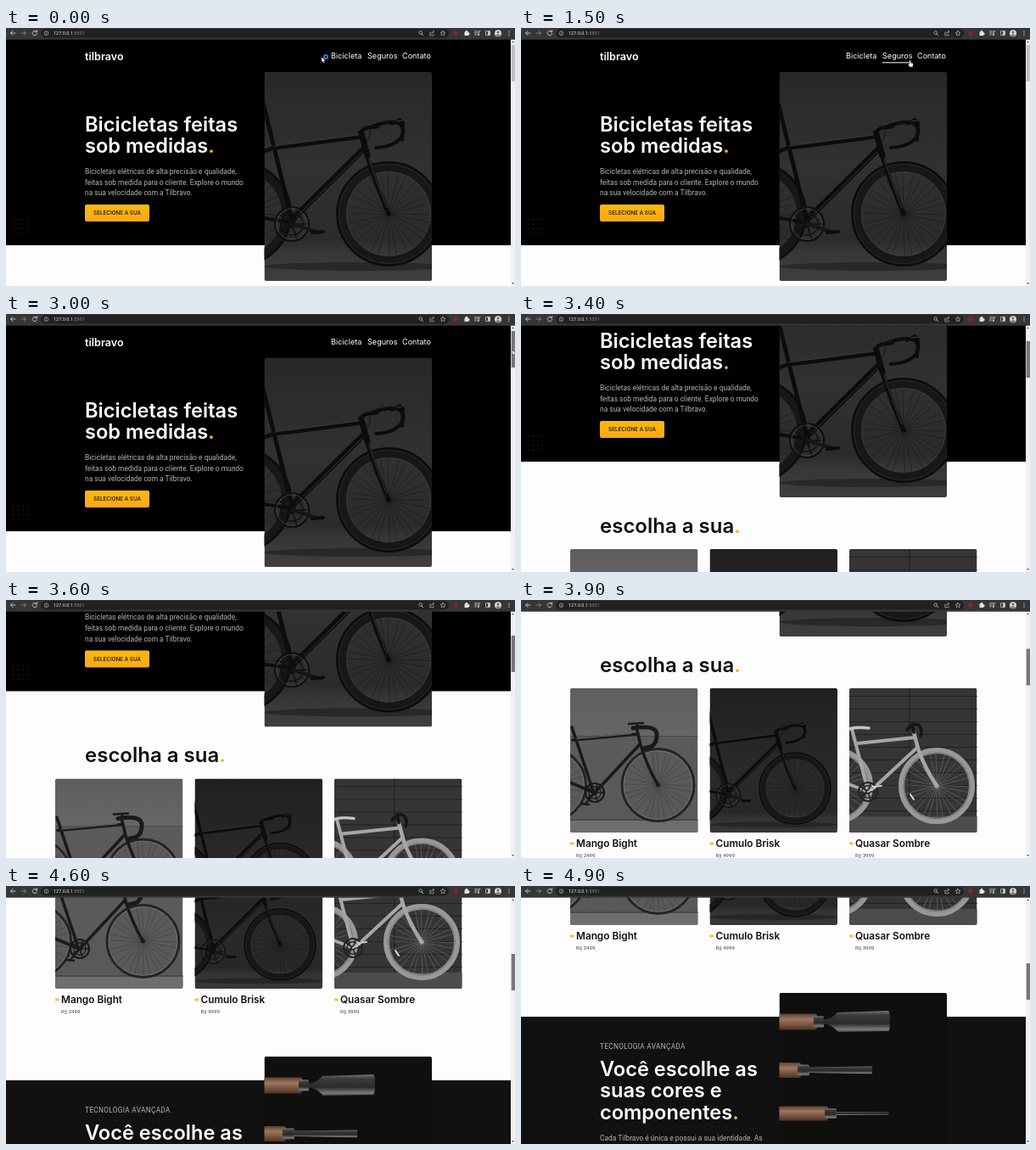
Recreate the animation shown at these times as an HTML page. Size 600 by 304 pixels, loop 5000 ms.

```html
<!DOCTYPE html>
<html lang="pt-BR">
<head>
<meta charset="utf-8">
<title>Loja de bicicletas</title>
<style>
html, body { margin: 0; width: 100%; height: 100%; overflow: hidden; background: #fdfdfd; }
svg { display: block; width: 100vw; height: 100vh; }
text { font-family: Inter, sans-serif; font-weight: 500; white-space: pre; }
.head { font-size: 23.6px; font-weight: 600; fill: #fff; }
.dark { fill: #111; }
.gold { fill: #fdb513; }
.nav { font-size: 9.1px; font-weight: 400; fill: #fff; }
.body { font: 8.43px Roboto, sans-serif; fill: #b4b4b4; }
.label { font: 8.3px Roboto, sans-serif; letter-spacing: .3px; fill: #b4b4b4; }
.name { font-size: 11.8px; font-weight: 600; fill: #111; }
.price { font: 6.1px Roboto, sans-serif; fill: #444; }
.line { fill: none; stroke-linecap: round; stroke-linejoin: round; }
</style>
</head>
<body>
<svg id="stage" viewBox="0 0 600 304" preserveAspectRatio="none"></svg>
<script>
const LOOP = 5000, STEP = 100;

const text = (x, y, cls, s, extra = "") => `<text x="${x}" y="${y}" class="${cls}" ${extra}>${s}</text>`;
const rect = (x, y, w, h, fill, r = 0) => `<rect x="${x}" y="${y}" width="${w}" height="${h}" rx="${r}" fill="${fill}"/>`;
const circle = (x, y, r, fill) => `<circle cx="${x}" cy="${y}" r="${r}" fill="${fill}"/>`;
const ring = (x, y, r, color, w) => `<circle cx="${x}" cy="${y}" r="${r}" fill="none" stroke="${color}" stroke-width="${w}"/>`;
const line = (d, color, w) => `<path class="line" d="${d}" stroke="${color}" stroke-width="${w}"/>`;
const shape = (d, fill) => `<path d="${d}" fill="${fill}"/>`;
const many = (n, f) => Array.from({ length: n }, (_, i) => f(i)).join("");
const dot = '<tspan class="gold">.</tspan>';

function fade(id, stops) {
  const list = stops.map(([o, c]) => `<stop offset="${o}" stop-color="${c}"/>`).join("");
  return `<linearGradient id="${id}" x2="0" y2="1">${list}</linearGradient>`;
}

function photo(id, x, y, w, h, fill, inside) {
  return `<clipPath id="${id}"><rect x="${x}" y="${y}" width="${w}" height="${h}" rx="2"/></clipPath>
    <g clip-path="url(#${id})">${rect(x, y, w, h, fill)}${inside}</g>`;
}

function wheel(x, y, r, tire, width, rim, rimWidth, spoke, n = 28) {
  const inner = r - width - rimWidth / 2;
  const spokes = many(n, i => {
    const a = i / n * 2 * Math.PI, b = a + (i % 2 ? 0.25 : -0.25);
    const p = (q, len) => `${(x + len * Math.cos(q)).toFixed(1)} ${(y + len * Math.sin(q)).toFixed(1)}`;
    return `M${p(a, 2)}L${p(b, inner)}`;
  });
  return line(spokes, spoke, 0.45) + ring(x, y, inner, rim, rimWidth)
    + ring(x, y, r - width / 2, tire, width) + circle(x, y, 2.5, tire);
}

function chainring(x, y, r, color) {
  return ring(x, y, r, color, 2.2) + ring(x, y, r * 0.66, color, 1.3)
    + line(many(5, i => {
      const a = i * 0.4 * Math.PI;
      return `M${x} ${y}l${(r * Math.cos(a)).toFixed(1)} ${(r * Math.sin(a)).toFixed(1)}`;
    }), color, 1.6) + circle(x, y, r * 0.25, color);
}

// black road bike, shared by the hero and the second card
function roadBike() {
  const c = "#0c0c0d", shine = "#4b4a4b";
  return `<ellipse cx="415" cy="281" rx="110" ry="5" fill="#1d1d1d" opacity=".6"/>`
    + wheel(275, 219, 62, c, 3, "#171717", 9, "#111")
    + wheel(451, 219, 62, c, 3, "#171717", 9, "#111")
    + ring(451, 219, 58.7, "#3a3a3a", 0.5) + ring(451, 219, 49.5, "#444", 0.5)
    + line("M302 84Q318 150 336 222M305 145Q316 140 335 139L419 128", c, 5)
    + line("M423 141L337 226", c, 7) + line("M304 224L336 229", c, 4)
    + line("M419 125L426 150", c, 7) + line("M425 149Q436 185 451 219", c, 5)
    + line("M316 139L416 126M420 146L342 223M428 154Q438 186 449 212", shine, 0.7)
    + line("M417 123L424 118L438 116", c, 4.5)
    + line("M432 116Q450 109 462 112Q472 117 466 129Q457 140 436 141", c, 4.2)
    + line("M455 113L464 108L468 112L467 132", c, 4) + line("M460 110L467 109", shine, 0.8)
    + line("M420 139Q431 130 429 121", c, 0.8)
    + chainring(337, 231, 20, "#101010") + ring(337, 231, 18, "#555", 0.6)
    + line("M337 231L366 240", "#161616", 4) + line("M361 241L374 240", c, 4);
}

function fixedBike() {
  const c = "#1a1a1a";
  return wheel(34, 473, 44, "#242424", 3, "#757575", 1, "#353535")
    + wheel(161.5, 473, 44, "#242424", 3, "#757575", 1, "#353535")
    + line("M60 405L85 480M61 420L137 413M88 481L140 425M58 470L86 482", c, 3.6)
    + line("M66 418.5L130 412.5", "#858585", 0.7)
    + line("M136 405L141 426Q149 452 161.5 473", c, 3.6)
    + line("M136 407L137 402M127 401L144 400", c, 2.6)
    + line("M132 406Q158 402 160 412Q161 424 153 428L144 430", c, 5)
    + chainring(87, 482, 11, c) + line("M87 482L76 495M71 495L80 496", c, 2.5);
}

function whiteBike() {
  const c = "#a6a6a6", tire = "#989898";
  return wheel(370, 474, 45, tire, 5.5, "#858585", 1.5, "#858585")
    + wheel(490, 474, 45, tire, 5.5, "#858585", 1.5, "#858585")
    + line("M390 407L409 480M396 424L464 417M412 480L468 428M386 472L410 481", c, 4)
    + line("M463 411L468 430Q475 451 490 474", c, 4.5)
    + line("M386 407Q396 404 410 406", "#c4c4c4", 3.4)
    + line("M463 411L461 401M455 408Q461 400 468 402Q474 406 471 415", "#151515", 3.6)
    + chainring(409, 481, 11, "#242424") + line("M409 481L419 475M414 475L425 474", "#ccc", 2)
    + line("M459 484L463 490", "#ddd", 2);
}

function tool(y, handle, h, ferrule, blade) {
  return rect(300, y - h / 2, handle - 300, h, "url(#wood)", 3)
    + rect(handle - 4, y - h * 0.36, ferrule - handle + 4, h * 0.72, "url(#metal)", 1.5) + blade;
}

function card(i, x, inside, fill, name, price) {
  return photo("card" + i, x, 359, 150.5, 170, fill, inside)
    + rect(x, 540.5, 4.6, 3, "#fdc02a", 0.8)
    + text(x + 7, 546, "name", name) + text(x + 7, 558, "price", price);
}

const links = [
  { x: 383, w: 36, label: "Bicicleta", from: 200, to: 1100 },
  { x: 426, w: 34, label: "Seguros", from: 1100, to: 1800 },
  { x: 467, w: 35, label: "Contato", from: 1800, to: 2100 }
];

function hero() {
  return rect(0, 0, 595, 256, "#000")
    + many(16, i => rect(8 + i % 4 * 5.7, 225 + (i >> 2) * 5.5, 1, 1, "#39342a"))
    + text(93, 37.6, "head", "tilbravo", 'style="font-size:12.6px"')
    + links.map((l, i) => text(l.x, 35.9, "nav", l.label) + `<rect id="bar${i}" x="${l.x}" y="40.3" height="1" fill="#fff"/>`).join("")
    + text(93, 121.8, "head", "Bicicletas feitas") + text(93, 147.3, "head", "sob medidas" + dot)
    + text(93, 172, "body", "Bicicletas elétricas de alta precisão e qualidade,")
    + text(93, 184.7, "body", "feitas sob medida para o cliente. Explore o mundo")
    + text(93, 197.4, "body", "na sua velocidade com a Tilbravo.")
    + rect(93, 208, 76, 20, "url(#button)", 2)
    + text(131, 220.3, "dark", "SELECIONE A SUA", 'text-anchor="middle" font-size="6.3"')
    + photo("hero", 304.5, 52, 197.5, 246, "url(#studio)", roadBike());
}

function shop() {
  const wall = rect(58, 415, 151, 1, "#484848") + rect(156, 416, 1, 98, "#505050")
    + rect(58, 515, 151, 14, "#6e6e6e") + rect(58, 513, 151, 2, "#494949");
  const planks = many(10, i => rect(387, 368 + i * 15, 151, 1, "#222")) + rect(457, 359, 1.5, 151, "#252525")
    + rect(387, 510, 151, 20, "#4c4c4c");
  const mini = `<g transform="translate(323 477) scale(.69) translate(-451 -219)">${roadBike()}</g>`;
  return text(93, 340, "head", "escolha a sua" + dot, 'style="fill:#111;font-size:24px"')
    + card(1, 58, wall + fixedBike(), "url(#wall)", "Mango Bight", "R$ 2499")
    + card(2, 222.5, mini, "url(#night)", "Cumulo Brisk", "R$ 4999")
    + card(3, 387, planks + whiteBike(), "#353535", "Quasar Sombre", "R$ 3999");
}

function tech() {
  const tools = tool(643, 349, 19, 357, shape("M356 641Q366 640 373 632L433 630Q435 631 435 642Q435 653 433 654L374 655Q366 646 356 645Z", "url(#metal)"))
    + tool(700, 330, 18, 340, shape("M339 696.5L414 695.5V704.5L339 703Z", "url(#metal)"))
    + tool(751, 362, 17, 372, shape("M371 749L434 749.5L433 752.5L371 753Z", "url(#metal)"));
  return rect(0, 637, 595, 300, "#111")
    + text(93, 675.3, "label", "TECNOLOGIA AVANÇADA")
    + text(93, 706.8, "head", "Você escolhe as") + text(93, 732.3, "head", "suas cores e")
    + text(93, 757.8, "head", "componentes" + dot)
    + text(93, 782.5, "body", "Cada Tilbravo é única e possui a sua identidade. As")
    + photo("tools", 304.5, 609, 197.5, 247, "#0f0f0e", tools);
}

function toolbar() {
  const c = "#c9cacc";
  return rect(0, 0, 600, 13.7, "#35363a") + rect(41, 1, 481, 10.5, "#202124", 5.2)
    + line("M11 6H5.5M8 3.5L5.5 6L8 8.5", c, 0.9) + line("M18 6H23.5M21 3.5L23.5 6L21 8.5", "#85868a", 0.9)
    + line("M36 4.2A2.7 2.7 0 1 0 36.6 6.6M36.6 2.8V4.8H34.6", c, 0.9)
    + ring(47.5, 6.2, 2.4, c, 0.6) + line("M47.5 6V7.6M47.5 4.7V4.8", c, 0.6)
    + `<text x="56" y="8.2" style="font:5.5px Roboto,sans-serif" fill="#e8eaed">127.0.0.1<tspan fill="#8a8d91">:5501</tspan></text>`
    + ring(488.7, 5.5, 1.8, c, 0.7) + line("M490 7L491.8 8.8", c, 0.8)
    + line("M501 5H499.8V8.8H504.2V7.5M501.5 7Q501.8 4.5 504.5 4.3M503.2 3L504.6 4.3L503.2 5.6", c, 0.6)
    + line("M515 3.2L515.9 5.1L518 5.3L516.4 6.7L516.9 8.8L515 7.7L513.1 8.8L513.6 6.7L512 5.3L514.1 5.1Z", c, 0.6)
    + circle(530, 6, 2.8, "#8c2522")
    + rect(540.5, 4.3, 4.8, 4.8, "#e0e1e3", 0.5) + circle(543, 4, 1.2, "#e0e1e3") + circle(545.4, 6.7, 1.2, "#e0e1e3")
    + line("M552.5 3.8H556.5M552.5 5.8H556.5M552.5 7.8H554.5M557.6 7.8V3.6H559", c, 0.8) + circle(556.8, 8, 1, c)
    + `<rect x="565.5" y="3.5" width="5" height="5" rx=".6" fill="none" stroke="${c}" stroke-width=".8"/>` + rect(568, 3.5, 2.5, 5, c)
    + circle(580, 6.2, 4, "#d6d8dc") + shape("M577 8.8Q580 5.5 583 8.8Q580 11 577 8.8Z", "#77706e") + circle(580, 5, 1.5, "#77706e")
    + many(3, i => circle(593, 4 + i * 2.2, 0.65, c));
}

const stage = document.getElementById("stage");
stage.innerHTML = "<defs>"
  + fade("button", [[0, "#fcb80a"], [1, "#f8a81a"]])
  + fade("studio", [[0, "#292829"], [0.45, "#323132"], [0.8, "#2c2b2c"], [0.86, "#373637"], [1, "#403f40"]])
  + fade("wall", [[0, "#5e5e5e"], [0.33, "#666"], [0.34, "#5b5b5b"], [1, "#585858"]])
  + fade("night", [[0, "#212021"], [0.6, "#2b2a2b"], [0.86, "#282728"], [0.9, "#343334"], [1, "#383738"]])
  + fade("wood", [[0, "#5d4034"], [0.35, "#a0765f"], [1, "#4e3328"]])
  + fade("metal", [[0, "#777473"], [0.2, "#3d3b3a"], [0.6, "#2b2928"], [0.88, "#7d7b7a"], [1, "#45423f"]])
  + "</defs>" + rect(0, 0, 600, 304, "#fdfdfd")
  + `<g id="page">${hero()}${shop()}${tech()}</g>`
  + rect(595, 13, 5, 291, "#f1f1f1") + shape("M596 17.3L597.6 15.3L599.2 17.3Z", "#666") + shape("M596 300L597.6 302L599.2 300Z", "#666")
  + `<rect id="thumb" x="595.7" width="4.3" height="43"/>` + toolbar()
  + `<g id="pointer"><path id="arrow" d="M0 0V6.6L1.5 5.2L2.5 7.5L3.6 7L2.6 4.8H4.7Z" fill="#fff" stroke="#222" stroke-width=".5"/>
    <path id="hand" d="M-.8 .5Q0 -.5 .7 .5V3L3 3.5Q4 3.8 3.8 5L3.2 8H-.3L-2.4 5Q-2.5 4 -1.6 4.3L-.8 5Z" fill="#fff" stroke="#222" stroke-width=".5"/>
    <g id="busy">${ring(5, 0, 2.1, "#2f8fd8", 1.7)}</g></g>`;

const $ = id => document.getElementById(id);
const show = (id, on) => $(id).setAttribute("visibility", on ? "inherit" : "hidden");
const clamp = v => Math.max(0, Math.min(1, v));

// smooth monotone curve through [time, value] pairs
function track(keys, t) {
  const last = keys.length - 1;
  if (t <= keys[0][0]) return keys[0][1];
  if (t >= keys[last][0]) return keys[last][1];
  const slope = i => (keys[i + 1][1] - keys[i][1]) / (keys[i + 1][0] - keys[i][0]);
  const tangent = i => {
    if (i === 0) return 0;
    if (i === last) return slope(i - 1);
    const a = slope(i - 1), b = slope(i);
    return a * b <= 0 ? 0 : 2 * a * b / (a + b);
  };
  const i = keys.findIndex(k => k[0] > t) - 1;
  const [t0, v0] = keys[i], [t1, v1] = keys[i + 1];
  const d = t1 - t0, u = (t - t0) / d, w = 1 - u;
  return v0 * (1 + 2 * u) * w * w + tangent(i) * d * u * w * w
    + v1 * u * u * (3 - 2 * u) - tangent(i + 1) * d * u * u * w;
}

const scrollKeys = [[3000, 0], [3400, 82], [3900, 255], [4600, 408], [4900, 483]];
const xKeys = [[0, 372], [400, 402], [500, 402], [1000, 415], [1200, 440], [1500, 458.5], [1700, 460], [1900, 480], [2100, 505], [2300, 571], [2600, 592], [2900, 596.5]];
const yKeys = [[0, 34], [400, 37], [1500, 38], [2300, 37], [2900, 42]];

function draw(t) {
  const scroll = track(scrollKeys, t);
  $("page").setAttribute("transform", `translate(0 ${-scroll})`);
  $("thumb").setAttribute("y", 20 + scroll * 0.147);
  $("thumb").setAttribute("fill", t >= 3000 ? "#787878" : t >= 2700 ? "#a8a8a8" : "#c1c1c1");
  links.forEach((l, i) => {
    const grow = clamp((t - l.from) / 300) - clamp((t - l.to) / 300);
    $("bar" + i).setAttribute("width", l.w * Math.max(0, grow));
  });
  const over = links.some(l => t >= l.from && t < l.to);
  $("pointer").setAttribute("transform", `translate(${track(xKeys, t)} ${track(yKeys, t)})`);
  show("pointer", t < 3100);
  show("hand", over);
  show("arrow", !over);
  show("busy", t < 200);
}

const start = performance.now();
function tick() {
  const t = (performance.now() - start) % LOOP;
  draw(Math.floor(t / STEP) * STEP);
  requestAnimationFrame(tick);
}
tick();
</script>
</body>
</html>
```
